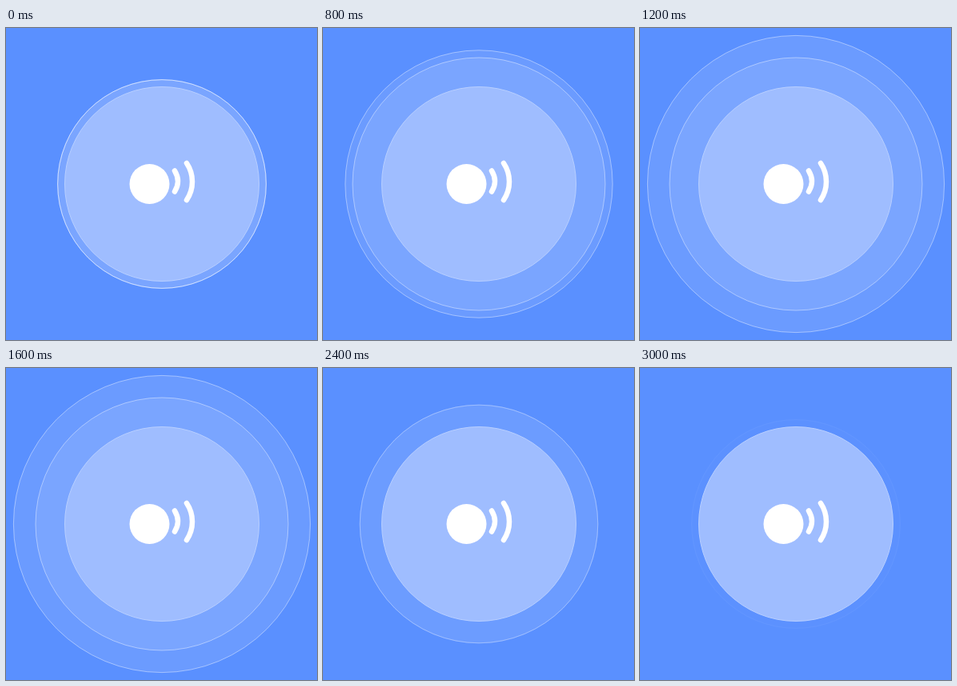
Animation, 389 px wide and 390 px high, one loop 3200 ms. Source, as an HTML page:

```html
<!DOCTYPE html>
<html lang="en">
<head>
<meta charset="utf-8">
<title>Wireless pulse</title>
<style>
  html, body { margin: 0; width: 100%; height: 100%; overflow: hidden; background: #5a90ff; }
  svg { display: block; width: 100%; height: 100%; }
  .ring { fill: rgb(255 255 255 / .1); stroke: rgb(255 255 255 / .42); }
  .waves { fill: none; stroke: #fff; stroke-width: 6.5; stroke-linecap: round; }
</style>
</head>
<body>
<svg viewBox="0 0 389 390">
  <g id="rings">
    <circle id="outer" class="ring" cx="195" cy="195"/>
    <circle id="middle" class="ring" cx="195" cy="195"/>
  </g>
  <circle cx="195" cy="195" r="121.5" fill="#9fbdff" stroke="#b8cfff"/>
  <circle cx="179.5" cy="195" r="25" fill="#fff"/>
  <path class="waves" d="M211 178.5Q219 191.5 211 204.5M226 169A41.3 41.3 0 0 1 226 215"/>
</svg>
<script>
const STEP = 200, STEPS = 16, PEAK = 7;
const MIN_R = 130.4, GROWTH = 9.2, MIDDLE_MAX = 158, OUTER_MAX = 193.6;
const FADE_START = 9.6, FADE_END = 15.4;
const [rings, outer, middle] = ['rings', 'outer', 'middle'].map(id => document.getElementById(id));

function draw(now) {
  const step = Math.floor(now / STEP) % STEPS;
  // Grow to the peak, shrink back, and fade out on the way down.
  const size = Math.max(0, PEAK - Math.abs(step - PEAK));
  const r = Math.min(MIN_R + GROWTH * size, OUTER_MAX);
  outer.setAttribute('r', r);
  middle.setAttribute('r', Math.min(r, MIDDLE_MAX));
  rings.setAttribute('opacity', Math.min(1, (FADE_END - step) / (FADE_END - FADE_START)));
}

const start = performance.now();
function tick() {
  draw(performance.now() - start);
  requestAnimationFrame(tick);
}
tick();
</script>
</body>
</html>
```
